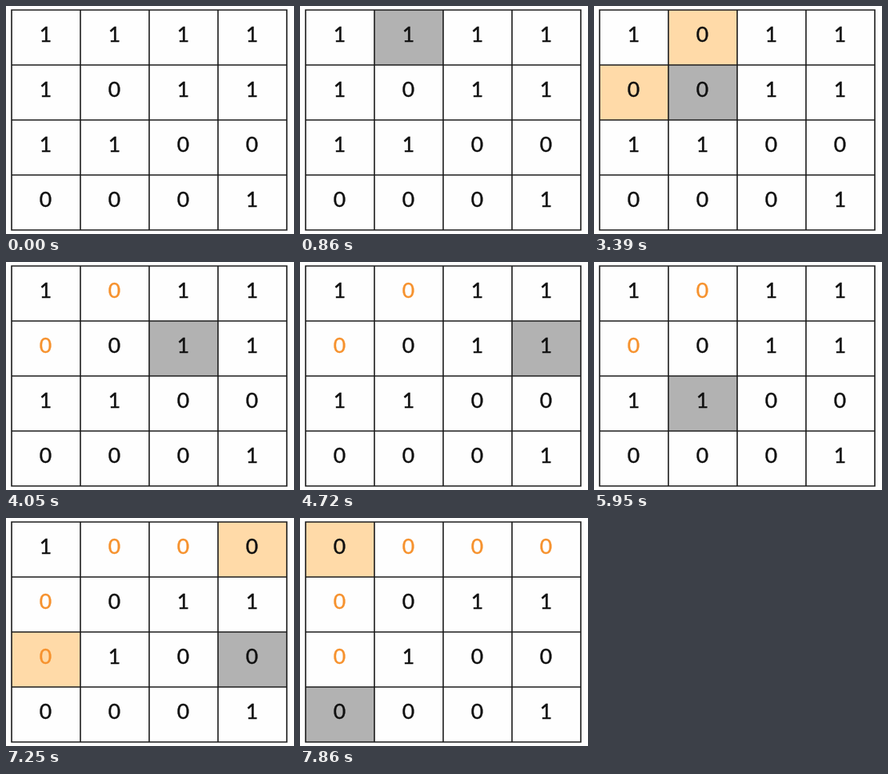
Recreate the animation shown at these times as an HTML page with a canvas. Size 360x286 px, loop 8000 ms.

```html
<!DOCTYPE html>
<html lang="en">
<head>
<meta charset="utf-8">
<title>Set matrix zeroes</title>
<style>
  html, body { margin: 0; width: 100%; height: 100%; overflow: hidden; background: #fefefe; }
  canvas { display: block; width: 360px; height: 286px; }
</style>
</head>
<body>
<canvas id="stage"></canvas>
<script>
const W = 360, H = 286, LOOP = 8000;
const N = 4, LEFT = 7, TOP = 5, CELL_W = 86, CELL_H = 69;
const COLORS = {
  paper: '#fefefe', line: '#1c1c1c', ink: '#111111',
  cursor: '#b2b2b2', mark: '#ffdaa8', marked: '#f6922e'
};
const MATRIX = [[1, 1, 1, 1], [1, 0, 1, 1], [1, 1, 0, 0], [0, 0, 0, 1]];
// Moments at which the cursor moves on to the next cell
const STEPS = [220, 860, 1500, 2160, 2800, 3390, 4050, 4720, 5310, 5950, 6610, 7250, 7860];

const canvas = document.getElementById('stage');
const ctx = canvas.getContext('2d');
const ratio = window.devicePixelRatio || 1;
canvas.width = W * ratio;
canvas.height = H * ratio;
ctx.scale(ratio, ratio);

// Visit cells up to the given step; each zero marks its row head and column head
function replay(step) {
  const first = {}, last = {};
  for (let s = 1; s <= step; s++) {
    const r = Math.floor((s - 1) / N), c = (s - 1) % N;
    if (MATRIX[r][c]) continue;
    for (const key of [r + ',0', '0,' + c]) {
      first[key] ??= s;
      last[key] = s;
    }
  }
  return { first, last };
}

function drawCell(r, c, step, marks) {
  const key = r + ',' + c;
  const x = LEFT + c * CELL_W, y = TOP + r * CELL_H;
  const isCursor = step === r * N + c + 1;
  const fill = isCursor ? COLORS.cursor : marks.last[key] === step ? COLORS.mark : null;
  if (fill) {
    ctx.fillStyle = fill;
    ctx.fillRect(x, y, CELL_W, CELL_H);
  }
  const digit = key in marks.first ? 0 : MATRIX[r][c];
  ctx.fillStyle = ctx.strokeStyle = marks.first[key] < step ? COLORS.marked : COLORS.ink;
  ctx.lineWidth = 0.4;
  soften(() => {
    ctx.fillText(digit, x + 42.4, y + 39.8);
    ctx.strokeText(digit, x + 42.4, y + 39.8);
  });
}

// Slightly soft edges, as in an enlarged picture
function soften(paint) {
  ctx.filter = `blur(${0.6 * ratio}px)`;
  paint();
  ctx.filter = 'none';
}

function drawGrid() {
  const right = LEFT + N * CELL_W, bottom = TOP + N * CELL_H;
  ctx.strokeStyle = COLORS.line;
  ctx.lineWidth = 1.6;
  ctx.lineCap = 'square';
  ctx.beginPath();
  for (let i = 0; i <= N; i++) {
    const x = LEFT + i * CELL_W, y = TOP + i * CELL_H;
    ctx.moveTo(x, TOP);
    ctx.lineTo(x, bottom);
    ctx.moveTo(LEFT, y);
    ctx.lineTo(right, y);
  }
  soften(() => ctx.stroke());
}

function draw(step) {
  const marks = replay(step);
  ctx.fillStyle = COLORS.paper;
  ctx.fillRect(0, 0, W, H);
  ctx.font = '26.5px Lato, sans-serif';
  ctx.textAlign = 'center';
  for (let r = 0; r < N; r++)
    for (let c = 0; c < N; c++) drawCell(r, c, step, marks);
  drawGrid();
}

const start = performance.now();
function tick() {
  const time = (performance.now() - start) % LOOP;
  draw(STEPS.filter(t => t <= time).length);
  requestAnimationFrame(tick);
}
tick();
</script>
</body>
</html>
```
